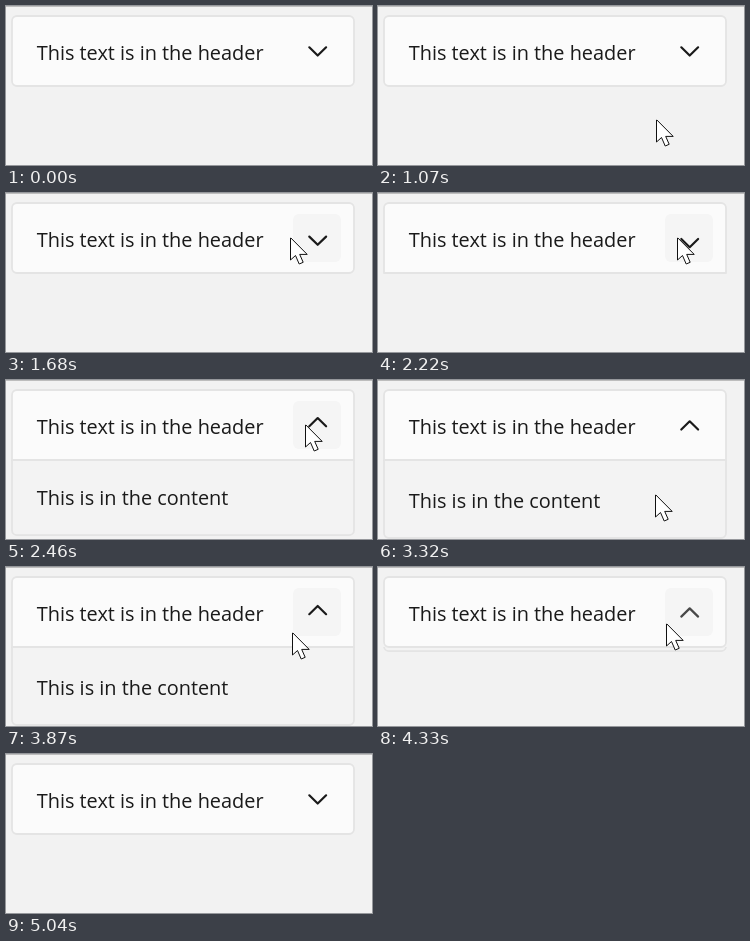
Recreate the animation shown at these times as an HTML page with a canvas. Size 366 px wide and 159 px high, loop 6190 ms.

```html
<!DOCTYPE html>
<html lang="en">
<head>
<meta charset="utf-8">
<title>Expander</title>
<style>
  html, body { margin: 0; width: 100%; height: 100%; overflow: hidden; background: #f2f2f2; }
  canvas { display: block; width: 366px; height: 159px; }
</style>
</head>
<body>
<canvas id="stage"></canvas>
<script>
const W = 366, H = 159, LOOP = 6190;
const canvas = document.getElementById('stage');
const ctx = canvas.getContext('2d');
const dpr = window.devicePixelRatio || 1;
canvas.width = W * dpr;
canvas.height = H * dpr;

const INK = '#1a1a1a', PRESSED = '#484848', BORDER = '#e4e4e4';
const HEAD_BOTTOM = 80, CONTENT_H = 78;
const OPEN_AT = 2230, OPEN_MS = 333, CLOSE_AT = 4239, CLOSE_MS = 154;

const clicks = [
  { down: 2070, up: 2200, flip: 2290, bend: -1 },
  { down: 4160, up: 4330, flip: 4380, bend: 1 }
];

// Bursts of activity, each moving the pointer to (x, y).
// ex and ey are the ease-out powers of the two axes.
const START = { x: 290, y: 165 };
const bursts = [
  { from: 1070, to: 1390, steps: 5, x: 266, y: 53, ex: 2.7, ey: 2.7 },
  { from: 1540, to: 1840, steps: 5, x: 300, y: 45, ex: 0.9, ey: 4 },
  { from: 2070, to: 2540, steps: 7, x: 300, y: 45, ex: 1, ey: 1 },
  { from: 2700, to: 3240, steps: 8, x: 279, y: 111, ex: 1.8, ey: 1.4 },
  { from: 3320, to: 3400, steps: 2, x: 277, y: 118, ex: 1, ey: 1 },
  { from: 3630, to: 4010, steps: 6, x: 289, y: 57, ex: 1.7, ey: 1.7 },
  { from: 4160, to: 4710, steps: 8, x: 289, y: 57, ex: 1, ey: 1 },
  { from: 4800, to: 5040, steps: 4, x: 302, y: 190, ex: 0.6, ey: 0.6 }
];

const clamp = v => Math.min(1, Math.max(0, v));
const easeOut = (p, power) => 1 - (1 - p) ** power;
const mix = (a, b, p) => a + (b - a) * p;

// Pointer place and clock, both held between the steps of a burst
function sample(t) {
  let state = { ...START, clock: 0 };
  for (const b of bursts) {
    if (t < b.from) break;
    const gap = (b.to - b.from) / (b.steps - 1);
    const step = Math.min(b.steps - 1, Math.floor((t - b.from) / gap + 0.2));
    const p = (step + 1) / b.steps;
    state = {
      x: Math.round(mix(state.x, b.x, easeOut(p, b.ex))),
      y: Math.round(mix(state.y, b.y, easeOut(p, b.ey))),
      clock: b.from + step * gap
    };
    if (t < b.to) break;
  }
  return state;
}

// Cubic spline easing with control points (x1, y1), (x2, y2)
function spline(p, x1, y1, x2, y2) {
  const at = (u, a, b) => 3 * u * (1 - u) ** 2 * a + 3 * u * u * (1 - u) * b + u ** 3;
  let lo = 0, hi = 1;
  for (let i = 0; i < 24; i++) {
    const mid = (lo + hi) / 2;
    if (at(mid, x1, x2) < p) lo = mid; else hi = mid;
  }
  return at((lo + hi) / 2, y1, y2);
}

function openness(t) {
  if (t >= CLOSE_AT) return 1 - spline(clamp((t - CLOSE_AT) / CLOSE_MS), 1, 1, 0, 1);
  return spline(clamp((t - OPEN_AT) / OPEN_MS), 0, 0, 0, 1);
}

// Hover nudges the chevron along its point, a press pushes it down,
// and a flip overshoots and settles.
function chevronAt(t, hover) {
  let bend = 1, shift = 0, colour = INK;
  for (const c of clicks) {
    if (t >= c.flip) {
      bend = c.bend;
      shift = bend * 11 * Math.exp((c.flip - t) / 70);
    } else if (t >= c.down) {
      shift = 2.4;
      if (t < c.up) colour = PRESSED;
    }
  }
  return { y: 45.4 + (hover ? 2.3 * bend : 0) + shift, bend, colour };
}

function box(x, y, w, h, radii, fill, line) {
  ctx.beginPath();
  ctx.roundRect(x, y, w, h, radii);
  ctx.fillStyle = fill;
  ctx.fill();
  if (!line) return;
  ctx.strokeStyle = line;
  ctx.lineWidth = 1.8;
  ctx.stroke();
}

function label(text, y) {
  ctx.font = '19.9px "Open Sans", "Noto Sans", sans-serif';
  ctx.fillStyle = INK;
  ctx.fillText(text, 30.7, y);
}

function trace(points) {
  ctx.beginPath();
  for (const [x, y] of points) ctx.lineTo(x, y);
}

function drawContent(amount) {
  if (amount < 0.005) return;
  ctx.save();
  ctx.beginPath();
  ctx.rect(0, HEAD_BOTTOM, W, H);
  ctx.clip();
  ctx.translate(0, (amount - 1) * CONTENT_H);
  box(6, HEAD_BOTTOM, 342, CONTENT_H, [0, 0, 5, 5], '#f3f3f3', BORDER);
  label('This is in the content', 128);
  ctx.restore();
}

function drawChevron({ y, bend, colour }) {
  const d = 4.1 * bend;
  trace([[303.3, y - d], [311.7, y + d], [320.1, y - d]]);
  ctx.strokeStyle = colour;
  ctx.lineWidth = 2.2;
  ctx.lineCap = ctx.lineJoin = 'round';
  ctx.stroke();
}

function drawPointer(x, y) {
  ctx.save();
  ctx.translate(x - 0.5, y);
  trace([[0, 0], [0, 22], [5, 17.5], [8.7, 26], [12.7, 24.3], [9.2, 16.4], [16.3, 16.4]]);
  ctx.closePath();
  ctx.fillStyle = '#fff';
  ctx.fill();
  ctx.strokeStyle = '#111';
  ctx.lineWidth = 1;
  ctx.lineJoin = 'round';
  ctx.stroke();
  ctx.restore();
}

function draw(t) {
  const { x, y, clock } = sample(t);
  const hover = y < HEAD_BOTTOM;
  const expanded = clock > clicks[0].up && clock < CLOSE_AT;
  ctx.setTransform(dpr, 0, 0, dpr, 0, 0);
  ctx.fillStyle = '#f2f2f2';
  ctx.fillRect(0, 0, W, H);
  ctx.fillStyle = '#bdbdbd';
  ctx.fillRect(0, 0, W, 1);

  drawContent(openness(clock));
  const low = expanded ? 0 : 5;
  box(6, 10, 342, 70, [5, 5, low, low], '#fbfbfb', BORDER);
  label('This text is in the header', 54);
  if (hover) box(287, 21, 48, 48, 6, '#f5f5f5');
  drawChevron(chevronAt(clock, hover));
  drawPointer(x, y);
}

const start = performance.now();
function tick() {
  draw((performance.now() - start) % LOOP);
  requestAnimationFrame(tick);
}
tick();
</script>
</body>
</html>
```
